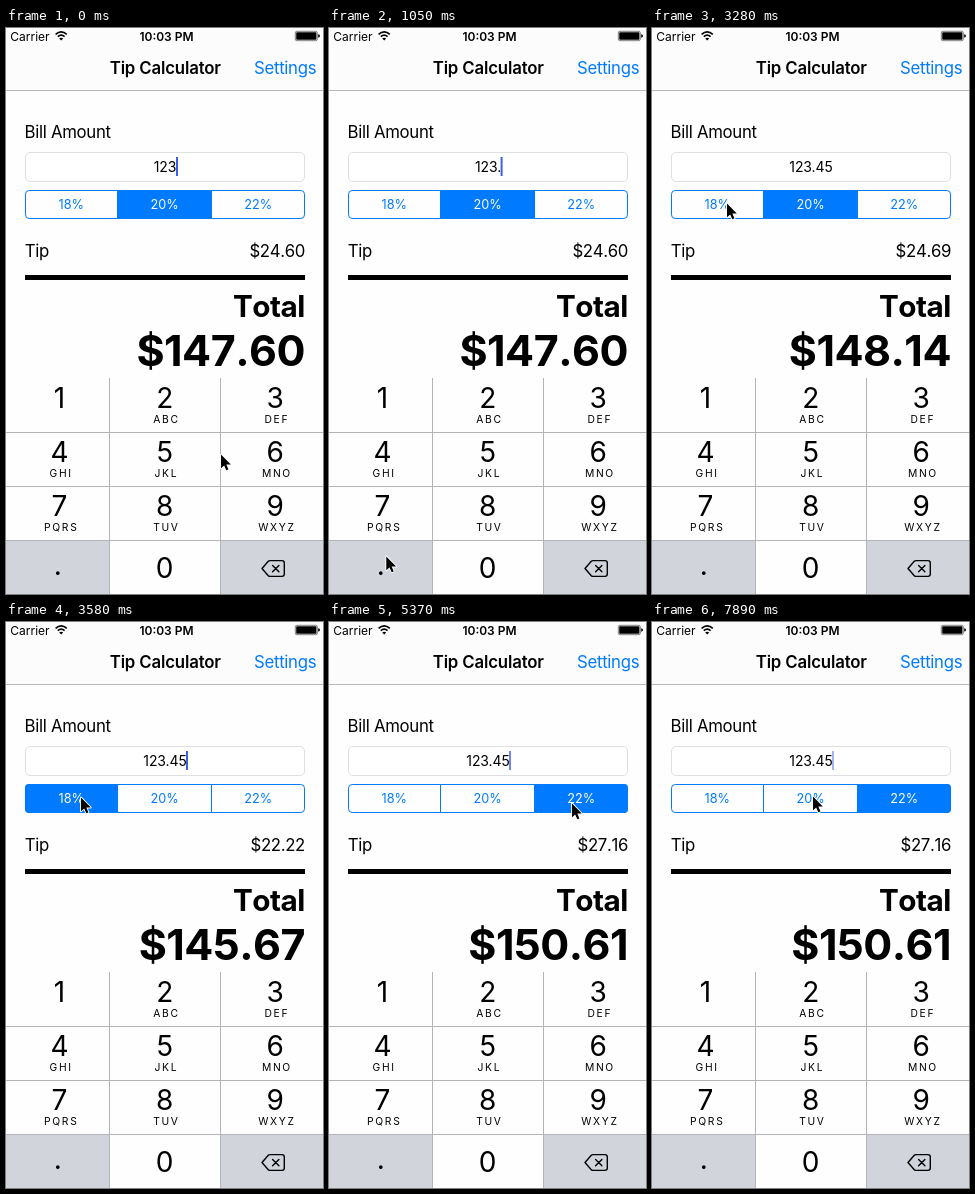
An HTML page that plays this animation: 317x566 px, repeating every 8000 ms.

```html
<!DOCTYPE html>
<html lang="en">
<head>
<meta charset="utf-8">
<title>Tip Calculator</title>
<style>
  html, body { margin: 0; width: 100%; height: 100%; overflow: hidden; background: #fefefe; }
  svg { display: block; width: 100vw; height: 100vh; }
  text { font-family: Inter, Roboto, "Liberation Sans", sans-serif; white-space: pre; }
  .body { font-size: 16.8px; letter-spacing: -.3px; }
  .title { font-size: 16.8px; letter-spacing: -.15px; }
  .money { font-size: 16.8px; letter-spacing: -.35px; text-anchor: end; font-kerning: none; }
  .status { font-size: 12px; }
  .mid { text-anchor: middle; }
  .semi { font-weight: 600; }
  .bold { font-weight: 700; text-anchor: end; font-kerning: none; }
  .seg { font-size: 12.7px; text-anchor: middle; }
  .digit { font-size: 28px; text-anchor: middle; }
  .letters { font-size: 10.3px; letter-spacing: 1.7px; text-anchor: middle; }
</style>
</head>
<body>
<svg id="stage" viewBox="0 0 317 566">
  <defs>
    <clipPath id="round"><rect x="19" y="162" width="280" height="29" rx="4"/></clipPath>
  </defs>
  <rect width="317" height="566" fill="#fefefe"/>

  <!-- status and title bar -->
  <rect width="317" height="62" fill="#fcfcfc"/>
  <rect y="62" width="317" height="1" fill="#b9b9bb"/>
  <text class="status" x="4.3" y="12.5">Carrier</text>
  <g fill="none" stroke="#000" stroke-width="1.7">
    <path d="M49.6 6.3Q55.2 1.3 60.8 6.3"/>
    <path d="M51.8 8.7Q55.2 5.6 58.6 8.7"/>
  </g>
  <path d="M55.2 12.6L53.2 10.4Q55.2 8.9 57.2 10.4Z"/>
  <text class="status semi mid" x="160.5" y="12.5">10:03 PM</text>
  <rect x="289.3" y="3.3" width="22" height="9.4" rx="1.6" fill="none" stroke="#000" stroke-width=".5"/>
  <rect x="290.2" y="4.2" width="20.2" height="7.6" rx=".8"/>
  <path d="M312.2 6.3Q314 6.6 314 8T312.2 9.7Z"/>
  <text class="title semi mid" x="159.3" y="46">Tip Calculator</text>
  <text class="body" x="248" y="46" fill="#007aff">Settings</text>

  <!-- form -->
  <text class="body" x="18.5" y="109.5">Bill Amount</text>
  <rect x="19.5" y="124.5" width="279" height="29" rx="4.5" fill="#fff" stroke="#dfdfdf"/>
  <text id="bill" class="mid" x="159" y="144" font-size="14" letter-spacing="-.1"></text>
  <rect id="caret" y="129" width="2" height="19" fill="#3d5fe6"/>
  <g id="segments" clip-path="url(#round)"></g>
  <path d="M111.5 162V191M205.5 162V191" stroke="#007aff"/>
  <rect x="19.5" y="162.5" width="279" height="28" rx="3.7" fill="none" stroke="#007aff"/>
  <text class="body" x="18.8" y="228.5">Tip</text>
  <text id="tip" class="money" x="299" y="228.5"></text>
  <rect x="19" y="247" width="280" height="5"/>
  <text class="bold" x="298.7" y="289" font-size="29.7" letter-spacing="-.5">Total</text>
  <text id="total" class="bold" x="299" y="337.7" font-size="43" letter-spacing="-.5"></text>

  <!-- keypad -->
  <rect id="dotKey" y="512" width="103" height="54"/>
  <rect x="214" y="512" width="103" height="54" fill="#d1d4db"/>
  <path d="M0 404.5H317M0 458.5H317M0 512.5H317M103.5 350V566M214.5 350V566" stroke="#b3b4b7"/>
  <g id="keys"></g>
  <g fill="none" stroke="#000" stroke-width="1.4" stroke-linejoin="round" stroke-linecap="round">
    <path d="M256 540.5L262.3 533.3Q263 532.6 264 532.6H276Q278.3 532.6 278.3 534.9V546.1Q278.3 548.4 276 548.4H264Q263 548.4 262.3 547.7Z"/>
    <path d="M266.6 537.4L272.9 543.7M272.9 537.4L266.6 543.7"/>
  </g>

  <path id="pointer" d="M0 0V13.8L3.2 10.9L5.3 15.8L7.4 14.9L5.4 10.1H9.8Z"
    stroke="#fff" stroke-width="1.8" stroke-linejoin="round" paint-order="stroke"/>
</svg>
<script>
const LOOP = 8000, STEP = 150, BLUE = '#007aff';
const $ = id => document.getElementById(id);

function add(parent, tag, attrs, text = '') {
  const el = document.createElementNS('http://www.w3.org/2000/svg', tag);
  for (const k in attrs) el.setAttribute(k, attrs[k]);
  el.textContent = text;
  parent.appendChild(el);
  return el;
}

const segments = [[18, 19, 111.5], [20, 111.5, 205.5], [22, 205.5, 299]].map(([rate, x0, x1]) => ({
  rate,
  box: add($('segments'), 'rect', { x: x0, y: 162, width: x1 - x0, height: 29 }),
  label: add($('segments'), 'text', { class: 'seg', x: (x0 + x1) / 2, y: 181 }, rate + '%')
}));

const columns = [53.5, 158.7, 269.2];
['', 'ABC', 'DEF', 'GHI', 'JKL', 'MNO', 'PQRS', 'TUV', 'WXYZ'].forEach((letters, i) => {
  const x = columns[i % 3], y = 379.8 + 54 * Math.floor(i / 3);
  add($('keys'), 'text', { class: 'digit', x, y }, i + 1);
  add($('keys'), 'text', { class: 'letters', x: x + 1.7, y: y + 15.2 }, letters);
});
add($('keys'), 'text', { class: 'digit', x: 158.5, y: 549.5 }, '0');
add($('keys'), 'text', { class: 'digit', x: 51.8, y: 546.7 }, '.');

const beats = [0, 2230, 4470, 6400, 6840];

// time typed, field content, caret position
const typing = [
  [-100, '123', 170],
  [740, '123.', 171.6],
  [1650, '123.4', 176],
  [2445, '123.45', 180]
];
const rates = [[0, 20], [3570, 18], [4610, 22]];

// time, x, y of the pointer tip
const path = [
  [0, 215, 426.5], [560, 57.3, 528.5], [1080, 57.3, 528.5], [1500, 50.3, 427], [1780, 50.3, 427],
  [2200, 143, 429.5], [2520, 143, 429.5], [3250, 75, 175.5], [3600, 75, 175.5],
  [4170, 243, 181.5], [5700, 243, 181.5], [6400, 161, 174.5]
];

const clamp = v => Math.max(0, Math.min(1, v));
const latest = (list, t) => list.filter(e => e[0] <= t).pop();

function tick(t) {
  const start = beats.filter(b => b <= t).pop();
  return start + STEP * Math.floor((t - start) / STEP);
}

function pointerAt(t) {
  const i = path.findIndex(p => p[0] > t);
  if (i < 0) return path[path.length - 1].slice(1);
  const [t0, x0, y0] = path[i - 1], [t1, x1, y1] = path[i];
  const u = (t - t0) / (t1 - t0), e = u * u * (3 - 2 * u);
  return [x0 + (x1 - x0) * e, y0 + (y1 - y0) * e];
}

function blink(age) {
  const p = (age + 105) % 985;
  return Math.min(clamp(p / 100), clamp((700 - p) / 160));
}

function render(time) {
  const t = tick(time);
  const [typed, bill, caretX] = latest(typing, t);
  const rate = latest(rates, t)[1];
  const tip = parseFloat(bill) * rate / 100;

  $('bill').textContent = bill;
  $('tip').textContent = '$' + tip.toFixed(2);
  $('total').textContent = '$' + (parseFloat(bill) + tip).toFixed(2);
  $('caret').setAttribute('x', caretX);
  $('caret').setAttribute('opacity', blink(t - typed));

  for (const s of segments) {
    const on = s.rate === rate;
    s.box.setAttribute('fill', on ? BLUE : '#fefefe');
    s.label.setAttribute('fill', on ? '#fff' : BLUE);
  }
  $('dotKey').setAttribute('fill', t >= 600 && t < 750 ? '#fefefe' : '#d1d4db');
  $('pointer').setAttribute('transform', `translate(${pointerAt(t)})`);
}

const began = performance.now();
function frame() {
  render((performance.now() - began) % LOOP);
  requestAnimationFrame(frame);
}
render(0);
frame();
</script>
</body>
</html>
```
